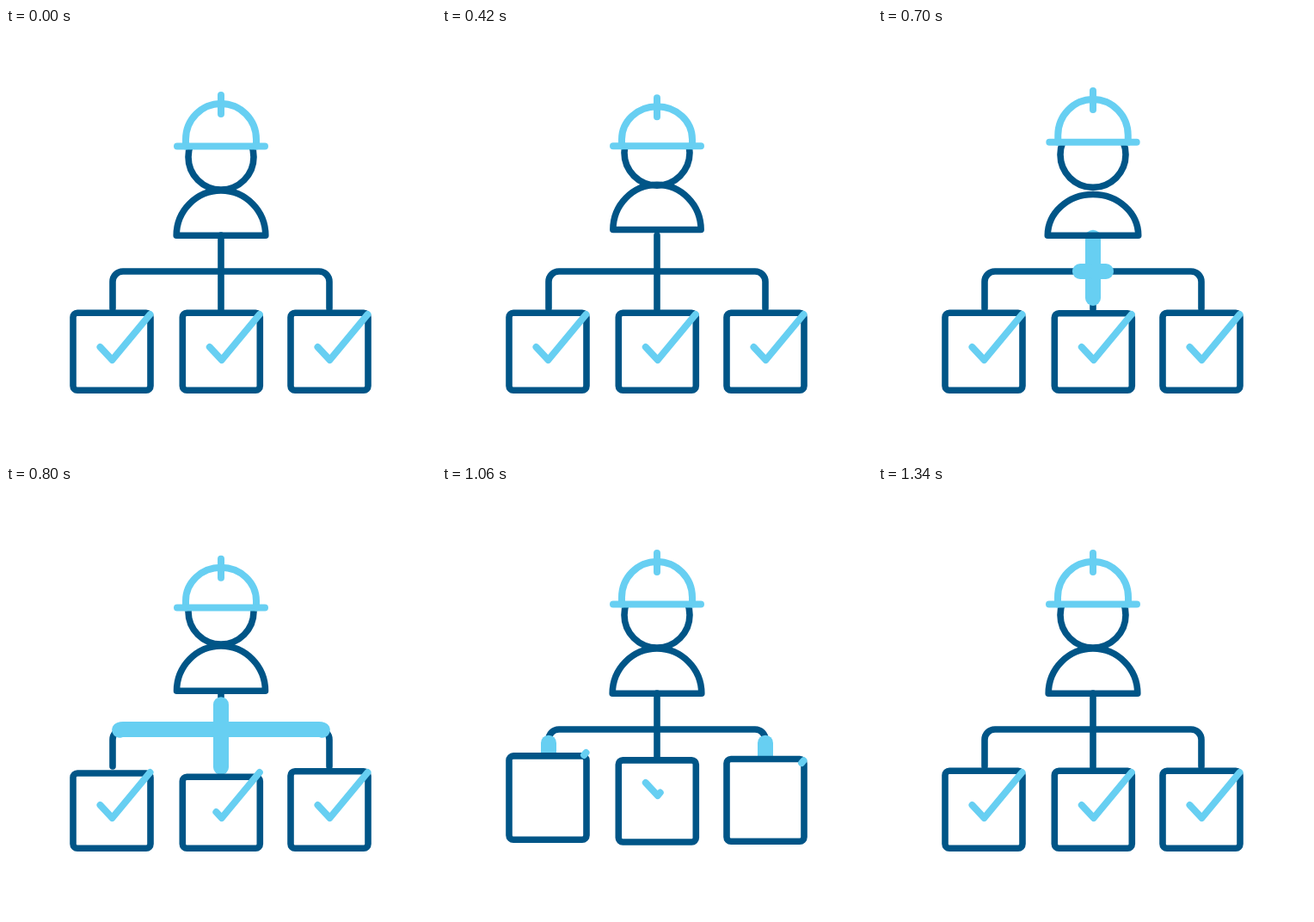
An HTML page with a canvas for the animation above (1660 ms loop, 500 by 500 pixels).

```html
<!DOCTYPE html>
<html lang="en">
<head>
<meta charset="utf-8">
<style>
html, body { margin: 0; height: 100%; overflow: hidden; background: #fff; }
canvas { display: block; width: 100vw; height: 100vh; }
</style>
</head>
<body>
<canvas id="stage" width="500" height="500"></canvas>
<script>
const LOOP = 1660, DARK = '#005587', LIGHT = '#67cff2';
const ctx = document.getElementById('stage').getContext('2d');
ctx.lineCap = ctx.lineJoin = 'round';

const progress = (t, from, to) => Math.max(0, Math.min(1, (t - from) / (to - from)));
const smooth = u => u * u * (3 - 2 * u);
const easeIn = u => u ** 3;
const easeOut = u => 1 - (1 - u) ** 3;
// Eases from 0 to 1 at the peak and back to 0.
const bump = (t, from, peak, to) =>
  smooth(t < peak ? progress(t, from, peak) : 1 - progress(t, peak, to));

function stroke(d, color, width = color === DARK ? 7.6 : 8, filled = false) {
  const path = new Path2D(d);
  ctx.fillStyle = '#fff';
  if (filled) ctx.fill(path);
  ctx.strokeStyle = color;
  ctx.lineWidth = width;
  ctx.stroke(path);
}

// Strokes only the part of a path between two distances.
function strokePart(d, from, to, width) {
  if (to - from < 0.3) return;
  ctx.setLineDash([to - from, 999]);
  ctx.lineDashOffset = -from;
  stroke(d, LIGHT, width);
  ctx.setLineDash([]);
}

const TRUNK = 'M250 241V327';
const ARMS = 'M124 326V295a12 12 0 0 1 12 -12H364a12 12 0 0 1 12 12V326';

function drawConnectors(t) {
  stroke(TRUNK + ARMS, DARK);
  strokePart(TRUNK, 86 * easeIn(progress(t, 560, 1010)), 86 * smooth(progress(t, 520, 760)), 18);
  const tail = 172 * smooth(progress(t, 870, 1140));
  const head = 172 * smooth(progress(t, 660, 885));
  for (const side of [-1, 1]) {
    const arm = `M250 283h${side * 114}a12 12 0 0 ${side > 0 ? 1 : 0} ${side * 12} 12V334`;
    strokePart(arm, tail, head, 18);
  }
}

const TICK_LENGTH = 89.4;
const boxes = [
  { x: 78, hop: 740, wipe: 798 },
  { x: 205.3, hop: 680, wipe: 735 },
  { x: 331, hop: 780, wipe: 798 }
];

function drawBox({ x, hop, wipe }, t) {
  const age = t - hop;
  const h = 90 - 8.5 * bump(age, 0, 165, 265) + 7.5 * bump(age, 220, 310, 500);
  const y = 421.3 - 10 * bump(age, 180, 320, 500) - h;
  stroke(`M${x + 5} ${y}h80a5 5 0 0 1 5 5v${h - 10}a5 5 0 0 1 -5 5h-80a5 5 0 0 1 -5 -5v${10 - h}a5 5 0 0 1 5 -5z`, DARK, undefined, true);

  const tick = `M${x + 31.5} ${371 - 27 * bump(age, 200, 360, 540)}l14 15l44 -53`;
  const back = wipe + 300;
  if (t < back) strokePart(tick, TICK_LENGTH * smooth(progress(t, wipe, back)), TICK_LENGTH);
  else strokePart(tick, 0, TICK_LENGTH * easeOut(progress(t, back, back + 250)));
}

function drawBody(t) {
  const lift = 11 * bump(t, 340, 480, 600) + 3 * bump(t, 730, 800, 880);
  const squash = 9 * bump(t, 220, 320, 410) + 5 * bump(t, 540, 680, 790);
  const w = 51.8 + 0.2 * squash - 0.1 * lift;
  const base = 241.3 - lift;
  stroke(`M${250 - w} ${base}a${w} ${52.3 - squash} 0 0 1 ${2 * w} 0z`, DARK);
}

function drawHead(t) {
  const y = 150 + 10 * bump(t, 220, 320, 400) - 22 * bump(t, 360, 560, 740)
    + 4 * bump(t, 700, 740, 790) - 4 * bump(t, 750, 800, 880);
  stroke(`M212 ${y}a38 38 0 0 1 76 0a38 38 0 0 1 -76 0z`, DARK);
}

function drawHat(t) {
  const leap = bump(t, 410, 570, 750);
  const brim = 137.5 + 13 * bump(t, 220, 320, 430) - 28.5 * leap
    + 7 * bump(t, 690, 760, 850) - 9 * bump(t, 830, 900, 1040);
  const squash = 4 * bump(t, 280, 390, 520) + 3 * bump(t, 700, 790, 880) - 1.5 * leap;
  const k = 1 - 0.035 * leap, r = 41 * k;
  stroke(`M${250 - r} ${brim}v-8a${r} ${41.5 - squash} 0 0 1 ${2 * r} 0v8`, LIGHT, 8, true);
  stroke(`M${250 - 51 * k} ${brim}h${102 * k}M250 ${brim - 59.5 + squash}v22`, LIGHT);
}

function draw(t) {
  ctx.fillStyle = '#fff';
  ctx.fillRect(0, 0, 500, 500);
  drawConnectors(t);
  for (const box of boxes) drawBox(box, t);
  drawBody(t);
  drawHead(t);
  drawHat(t);
}

const start = performance.now();
function frame() {
  draw((performance.now() - start) % LOOP);
  requestAnimationFrame(frame);
}
frame();
</script>
</body>
</html>
```
